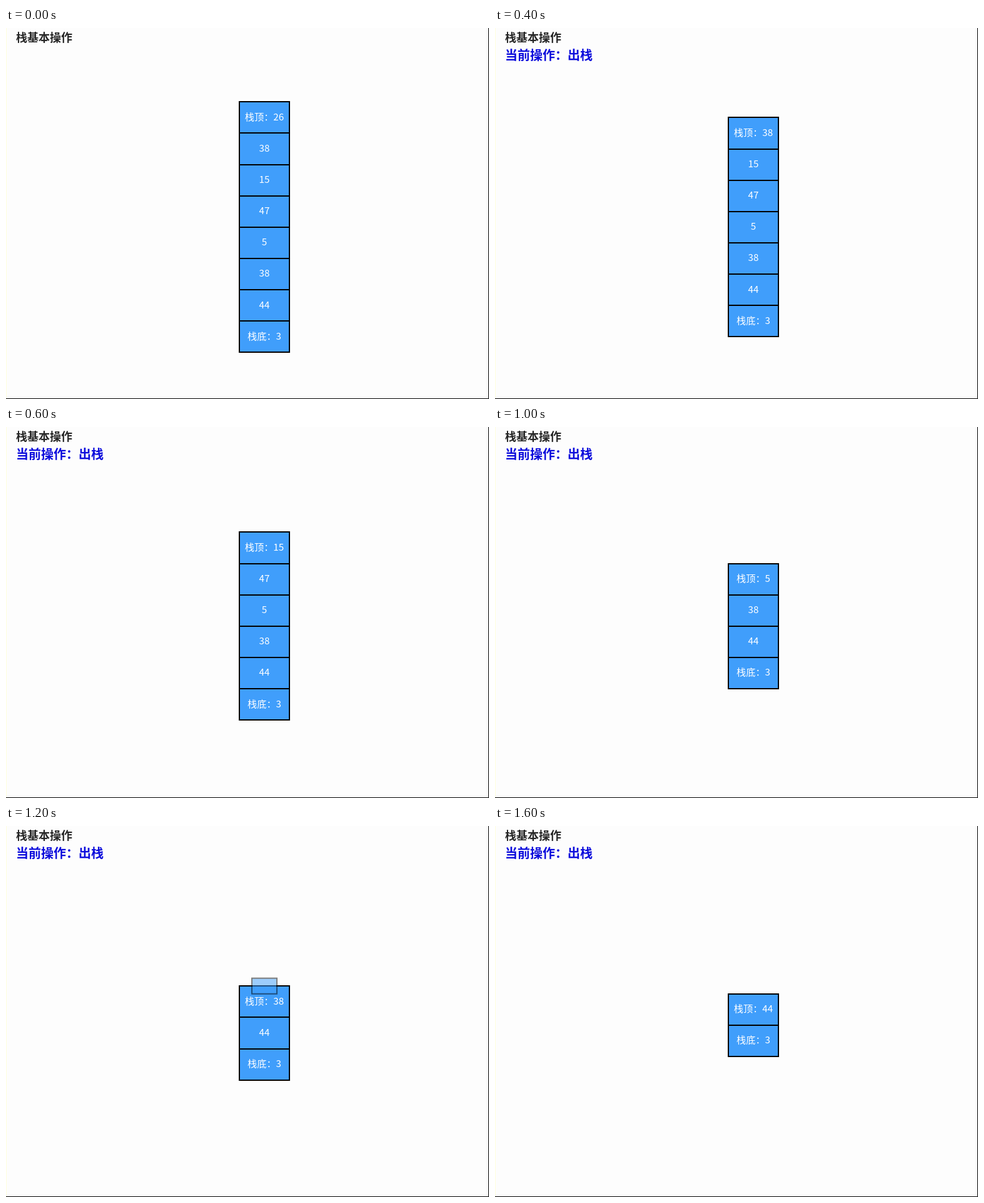
An HTML page for the animation above (1800 ms loop, 772 by 594 pixels).

```html
<!DOCTYPE html>
<html lang="zh-CN">
<head>
<meta charset="utf-8">
<title>栈基本操作</title>
<style>
  html, body { margin: 0; width: 100%; height: 100%; overflow: hidden; background: #fdfdfd; }
  svg { display: block; width: 772px; height: 594px; }
  text { font-family: "Noto Sans CJK SC", "Noto Sans CJK", "Noto Sans", sans-serif; }
  .head { font-weight: 700; }
  .box { fill: #409efb; stroke: #000; stroke-width: 2; }
  .label { font-size: 15.2px; font-weight: 500; fill: #fff; text-anchor: middle; }
</style>
</head>
<body>
<svg viewBox="0 0 772 594">
  <rect width="772" height="594" fill="#fdfdfd"/>
  <rect width="1" height="594" fill="#ffffdc"/>
  <path d="M771.5 0V593.5H0" fill="none" stroke="#000"/>
  <text class="head" x="16" y="21.5" font-size="18" fill="#262626">栈基本操作</text>
  <text class="head" id="action" x="16" y="50.5" font-size="20" fill="#0c0cdc">当前操作：出栈</text>
  <g id="stack"></g>
  <rect id="popped" class="box"/>
</svg>
<script>
const values = [26, 38, 15, 47, 5, 38, 44, 3];
const STEP = 200, PITCH = 50.14, WIDTH = 80, CX = 413, CY = 318.9;

// [items left, progress of the latest pop]
const steps = [[8, 1], [7, 0.85], [7, 1], [6, 1], [5, 1], [4, 1], [3, 0.5], [3, 1], [2, 1]];

const stack = document.getElementById("stack");
const popped = document.getElementById("popped");
const action = document.getElementById("action");

function add(tag, parent, attrs) {
  const el = document.createElementNS("http://www.w3.org/2000/svg", tag);
  set(el, attrs);
  return parent.appendChild(el);
}

function set(el, attrs) {
  for (const key in attrs) el.setAttribute(key, attrs[key]);
}

const show = (el, on) => { el.style.display = on ? "" : "none"; };
const restTop = n => CY - n * PITCH / 2;

const cells = values.map(() => {
  const g = add("g", stack, {});
  return {
    g,
    box: add("rect", g, { class: "box", x: CX - WIDTH / 2, width: WIDTH }),
    label: add("text", g, { class: "label", x: CX })
  };
});

function draw(index) {
  const [count, p] = steps[index];
  const first = values.length - count;
  const top = restTop(count) + (1 - p) * PITCH / 2;

  cells.forEach(({ g, box, label }, i) => {
    show(g, i >= first);
    if (i < first) return;
    const y = top + (i - first) * PITCH;
    const y0 = Math.round(y);
    set(box, { y: y0, height: Math.round(y + PITCH) - y0 });
    set(label, { y: y + 29.4 });
    const prefix = i === first ? "栈顶：" : i === values.length - 1 ? "栈底：" : "";
    label.textContent = prefix + values[i];
  });

  // The popped item shrinks and fades as the rest slides up
  const scale = 1 - p;
  const w = WIDTH * scale, h = PITCH * scale;
  const cy = restTop(count + 1) + (1 + p) * PITCH / 2;
  show(popped, p < 1);
  set(popped, { x: CX - w / 2, y: cy - h / 2, width: w, height: h, opacity: scale });
  show(action, index > 0);
}

let current = -1;
function tick() {
  const index = Math.floor(performance.now() / STEP) % steps.length;
  if (index !== current) draw(current = index);
  requestAnimationFrame(tick);
}
tick();
</script>
</body>
</html>
```
